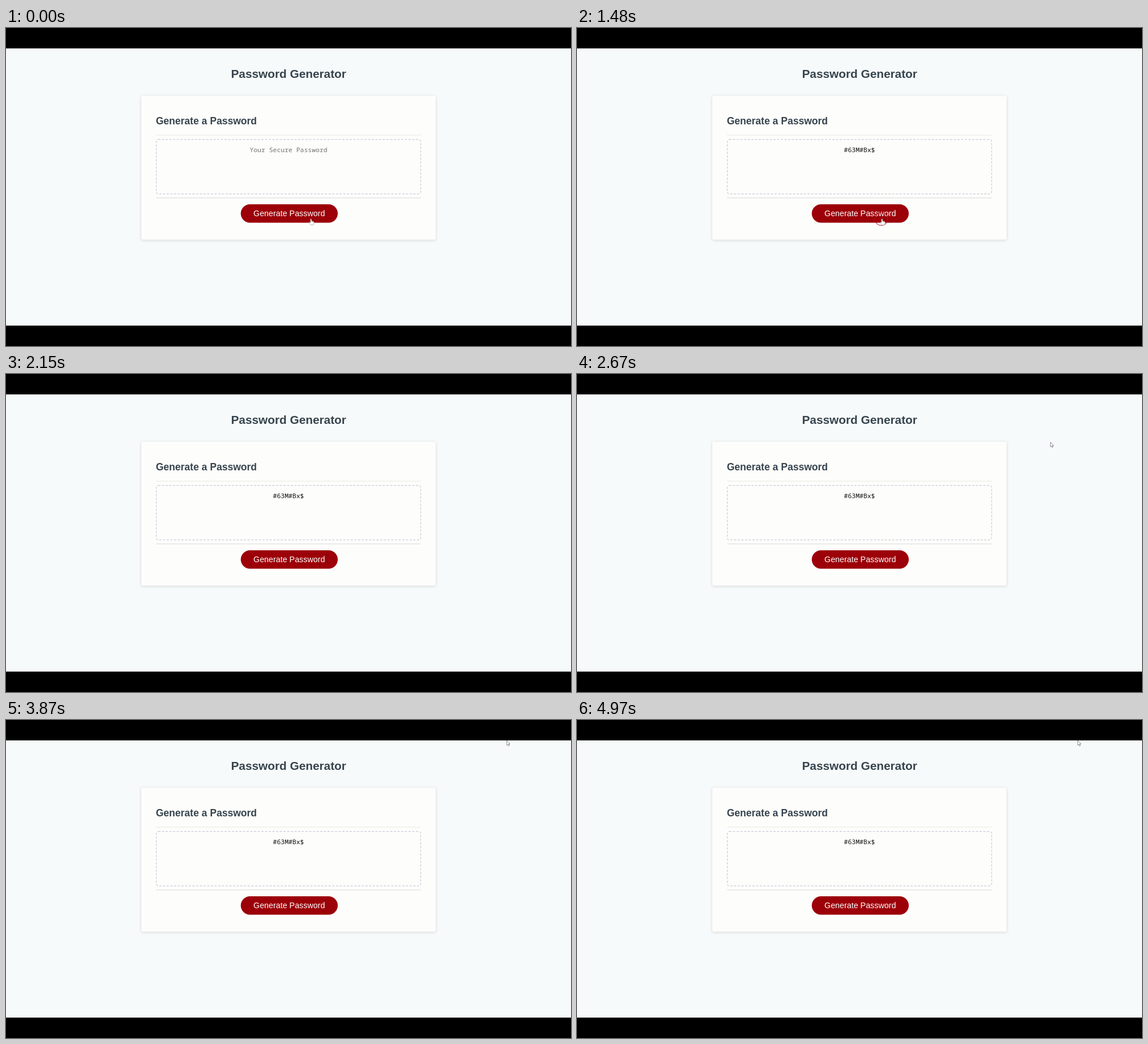
Animation, 998 px wide and 561 px high, one loop 5.01 s. Source, as an HTML page:

```html
<!DOCTYPE html>
<html lang="en">
<head>
<meta charset="utf-8">
<title>Password Generator</title>
<style>
  html, body { margin: 0; width: 100%; height: 100%; overflow: hidden; background: #000; }
  svg { display: block; font-family: "Liberation Sans", Arial, sans-serif; }
  .card { fill: #fdfdfb; filter: drop-shadow(0 1.3px 2.6px rgba(0, 0, 0, .15)); }
  .heading { fill: #36444e; font-weight: bold; }
  .mono { font: 11.44px "Noto Sans Mono", monospace; }
  .middle { text-anchor: middle; }
  .pointer { stroke-linejoin: round; fill: #fff; }
</style>
</head>
<body>
<svg width="998" height="561" viewBox="0 0 998 561">
  <rect y="36" width="998" height="489" fill="#f7fafa"/>
  <text class="heading middle" x="499.2" y="88" font-size="20.8">Password Generator</text>

  <rect class="card" x="239" y="119.5" width="520" height="254" rx="3.3"/>
  <text class="heading" x="264.7" y="169.6" font-size="17.55">Generate a Password</text>
  <path d="M265 189H733" stroke="#e6e7e0"/>
  <path d="M265 299.8H733" stroke="#d7d9e2"/>
  <rect x="265.5" y="196.7" width="467" height="96" rx="3.5" fill="none"
        stroke="#cac8dc" stroke-width="1.2" stroke-dasharray="3.9 2.6"/>
  <text id="password" class="mono middle" x="499" y="219"></text>

  <rect x="414.7" y="311" width="171.3" height="32.5" rx="16.25" fill="#9c0008"/>
  <text class="middle" x="500.2" y="332" font-size="14.3" fill="#fff">Generate Password</text>

  <circle id="ring" cx="537.5" cy="337" fill="none" stroke="#b4141c" stroke-width="1.2"/>
  <path id="hand" class="pointer" stroke="#777" stroke-width=".5"
        d="M-1 .8Q0-.5 1 .8V4L4.6 5Q5.4 5.4 5.2 6.6L4.2 11H-.6L-3.2 7Q-3.2 5.6-2 6L-1 7Z"/>
  <path id="arrow" class="pointer" stroke="#70707a" stroke-width=".8"
        d="M0 0V8.4L1.9 6.7L3.2 9.6L4.5 9L3.2 6.2H5.7Z"/>
</svg>
<script>
  const LOOP = 5010, CLICK = 1300, RING_LIFE = 400;
  const [password, ring, hand, arrow] =
    ["password", "ring", "hand", "arrow"].map(id => document.getElementById(id));

  // Each stop is [time, x, y]
  const handPath = [[1700, 538.8, 336.6], [1900, 560, 345]];
  const arrowPath = [[2400, 770, 215], [2670, 836.3, 120.3], [3130, 864.7, 60.8], [3470, 884.6, 36.2]];

  function along(path, t) {
    const i = path.findIndex(stop => stop[0] > t);
    if (i < 0) return path[path.length - 1].slice(1);
    if (i === 0) return path[0].slice(1);
    const [t0, x0, y0] = path[i - 1], [t1, x1, y1] = path[i];
    const k = (t - t0) / (t1 - t0);
    return [x0 + (x1 - x0) * k, y0 + (y1 - y0) * k];
  }

  function show(el, visible) {
    el.style.visibility = visible ? "visible" : "hidden";
  }

  function place(el, path, t, visible) {
    show(el, visible);
    el.setAttribute("transform", `translate(${along(path, t)})`);
  }

  function draw() {
    const t = performance.now() % LOOP;
    const done = t >= CLICK + 80;
    password.textContent = done ? "#63M#Bx$" : "Your Secure Password";
    password.setAttribute("fill", done ? "#111" : "#717671");

    const age = (t - CLICK) / RING_LIFE;
    show(ring, age >= 0 && age < 1);
    ring.setAttribute("r", 5 + 14 * Math.min(1, Math.max(0, age)));
    ring.setAttribute("opacity", Math.min(1, 1.3 * (1 - age)));

    place(hand, handPath, t, t < 1900);
    place(arrow, arrowPath, t, t >= 2400);
    requestAnimationFrame(draw);
  }
  draw();
</script>
</body>
</html>
```
